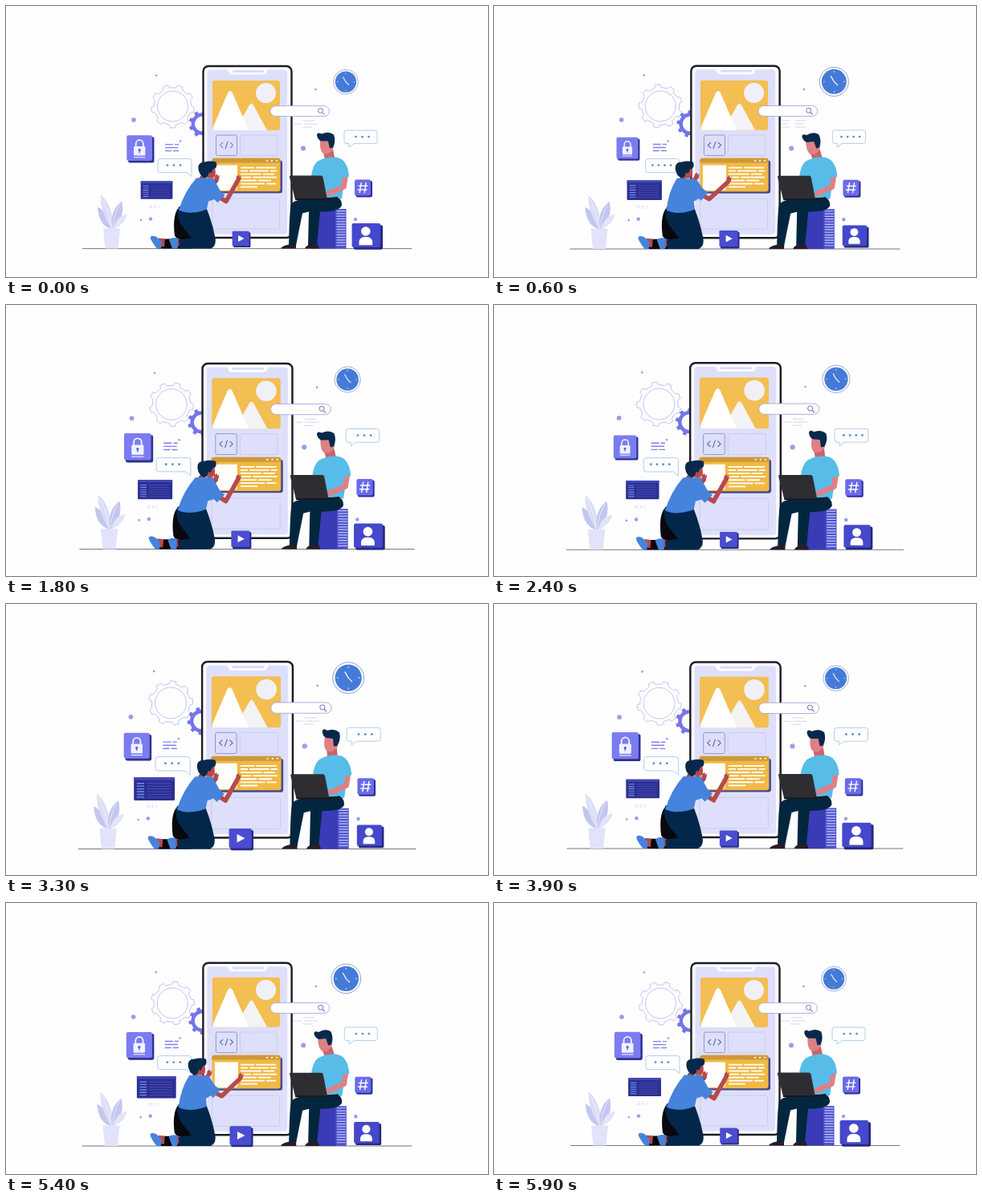
These frames come from a looping animation (600 by 338 pixels, 6000 ms). An HTML page:

```html
<!DOCTYPE html>
<html lang="en">
<head>
<meta charset="utf-8">
<style>
html, body { margin: 0; width: 100%; height: 100%; overflow: hidden; background: #fefefe; }
svg { display: block; width: 100vw; height: 100vh; }
.limb { fill: none; stroke-linecap: round; stroke-linejoin: round; }
</style>
</head>
<body>
<svg viewBox="0 0 600 338" xmlns="http://www.w3.org/2000/svg">
<g id="world">
  <g id="specks"></g>
  <g id="gearA" fill="#fefefe" stroke="#b9bbee" stroke-width=".8"><path/><circle r="19"/></g>
  <g id="gearB"><path fill="#7475ea"/><circle r="9.5" fill="#fefefe"/></g>

  <path d="M95 302H505" stroke="#77777f" stroke-width="1"/>

  <!-- plant -->
  <path d="M129 277Q115 271 114 250Q127 256 131 277Z" fill="#c3c6ef"/>
  <path d="M131 277Q116 252 118 235Q134 249 133 277Z" fill="#dcdef6"/>
  <path d="M132 277Q129 254 144 243Q149 262 134 277Z" fill="#c3c6ef"/>
  <path d="M134 277Q137 262 151 259Q149 270 136 277Z" fill="#e2e4f8"/>
  <path d="M121 277H142L139.500 302H123.500Z" fill="#e2e3fa"/>
  <path d="M118 238Q129 255 131.500 276M142 246Q134 260 133 276" fill="none" stroke="#f4f4fd" stroke-width=".7"/>

  <!-- phone -->
  <rect x="245.500" y="74.400" width="110" height="214" rx="6.500" fill="#fbfbff" stroke="#1d1d26" stroke-width="2.400"/>
  <rect x="250.500" y="79" width="99.500" height="205" rx="4" fill="#dedffa"/>
  <path d="M274 78H328Q325 79 324.500 82Q324 85 320 85H282Q278 85 277.500 82Q277 79 274 78Z" fill="#fdfdff"/>
  <rect x="282" y="79.500" width="39" height="2.600" rx="1.300" fill="#d8d9f6"/>
  <rect x="257" y="92.300" width="84" height="62" rx="3" fill="#f3be52"/>
  <circle cx="323.500" cy="108" r="12.500" fill="#f0f0f6"/>
  <path d="M285 154.300L303 123Q305.500 119 308 123L325 154.300Z" fill="#f4f3f5"/>
  <path d="M258 154.300V150L276 108Q279 103 282 108L302 154.300Z" fill="#fff"/>
  <g fill="none" stroke="#b9bde6" stroke-width=".8">
    <rect x="261.500" y="160.500" width="26" height="25.500" rx="2" stroke="#8288c0"/>
    <rect x="291.500" y="160.500" width="46" height="25.500" rx="2" stroke-dasharray="2 1"/>
    <rect x="257" y="239.500" width="83.500" height="38" rx="2" stroke-dasharray="2 1"/>
  </g>
  <path d="M270 169.500L266.500 173L270 176.500M279 169.500L282.500 173L279 176.500M276 168.500L273 177.500" fill="none" stroke="#555b91" stroke-width="1"/>

  <!-- yellow panel -->
  <rect x="260" y="192" width="84" height="41" rx="3" fill="#474a88"/>
  <rect x="256.500" y="189.200" width="85" height="41.500" rx="3" fill="#f1b945"/>
  <path d="M256.500 195V192Q256.500 189.200 259.500 189.200H338.500Q341.500 189.200 341.500 192V195Z" fill="#cf9938"/>
  <g fill="#fff"><circle cx="325" cy="192.200" r="1.100"/><circle cx="331" cy="192.200" r="1.100"/><circle cx="337" cy="192.200" r="1.100"/></g>
  <path d="M292 201H309M311 201H336M292 205H301M303 205H327M329 205H337M292 209H318M320 209H334M292 213H305M307 213H337M292 217H312M314 217H330M292 221H322M324 221H336M292 225H313" stroke="#fff" stroke-width="1.800"/>
  <path id="sheet" d="M260 198H289V225Q289 229.500 284 229.500H266Q260 229.500 260 225Z" fill="#fffefb"/>

  <!-- search -->
  <rect x="329" y="124" width="73.500" height="13" rx="6.500" fill="#fff" stroke="#a5a9df" stroke-width=".9"/>
  <circle cx="391.500" cy="129.800" r="3" fill="none" stroke="#6266b0" stroke-width=".9"/>
  <path d="M393.800 132.200L396.500 135" stroke="#6266b0" stroke-width="1"/>
  <g stroke="#d3d5ef" stroke-width="1">
    <path id="rowsA" d="M359 142.500H368M375 142.500H388M359 146.500H366M374 146.500H385M359 150.500H368M375 150.500H388"/>
    <path id="rowsB" d="M370 142.500H384M359 146.500H368M371 146.500H388M369 150.500H381"/>
  </g>
  <path d="M198 172H208M210 172H215M198 176H214M198 180H206M208 180H215" stroke="#8082ee" stroke-width="1.400"/>

  <!-- bubbles -->
  <g fill="#fff" stroke="#a9c8ec" stroke-width=".9">
    <path d="M192 190H228Q231 190 231 193V212L225 207H192Q189 207 189 204V193Q189 190 192 190Z"/>
    <path d="M424 154.500H459Q462 154.500 462 157.500V168Q462 171 459 171H433L427 175.500V171H424Q421 171 421 168V157.500Q421 154.500 424 154.500Z"/>
  </g>
  <g id="dots" fill="#5a8ed2"></g>

  <!-- clock -->
  <g id="clock">
    <circle r="17.500" fill="#fff" stroke="#8a9bd0" stroke-width=".9"/>
    <circle r="15" fill="#467ad8"/>
    <path d="M0 -13V-11M0 11V13M-13 0H-11M11 0H13" stroke="#cfe0ff" stroke-width="1"/>
    <path d="M-4 -7L0 0L4.500 4.500" fill="none" stroke="#f2f6ff" stroke-width="1.200"/>
  </g>

  <!-- pulsing tiles -->
  <g id="lock">
    <rect x="-14" y="-14" width="30.500" height="30.500" rx="2" fill="#31338f"/>
    <rect x="-15.800" y="-16" width="30" height="30" rx="2" fill="#7b7cf1"/>
    <path d="M-5 -2V-6A4.300 4.300 0 0 1 3.600 -6V-2" fill="none" stroke="#f1f1ff" stroke-width="1.700"/>
    <rect x="-7.500" y="-3" width="13.500" height="11" rx="1" fill="#f1f1ff"/>
    <path d="M-7.500 10H6" stroke="#f1f1ff" stroke-width="1"/>
    <circle cx="-.8" cy="1.500" r="1.500" fill="#6060d8"/><path d="M-.8 2V5" stroke="#6060d8" stroke-width="1.200"/>
  </g>
  <g id="code">
    <rect x="-22.200" y="-12.500" width="44.500" height="25" rx="1" fill="#2c2f92"/>
    <rect x="-22.200" y="-12.500" width="44.500" height="3" fill="#4346b8"/>
    <path d="M-19 -6H-11M-19 -3H-11M-19 0H-11M-19 3H-11M-19 6H-11M-19 9H-11" stroke="#6f8fe8" stroke-width="1.200"/>
    <path d="M-8 -6H18M-8 -3H18M-8 0H18M-8 3H18M-8 6H18M-8 9H18" stroke="#4a4db2" stroke-width=".9"/>
  </g>
  <g>
    <rect x="435.500" y="217.500" width="20.500" height="20.500" rx="2" fill="#2f3194"/>
    <rect x="434" y="216" width="20" height="20" rx="2" fill="#6a6bea"/>
    <path d="M442.200 219.500L440.200 232.500M448.200 219.500L446.200 232.500M438.500 223.800H450.500M437.500 228.500H449.500" stroke="#fff" stroke-width="1.400"/>
  </g>
  <g id="user">
    <rect x="-15" y="-12.500" width="32.500" height="27.500" rx="2" fill="#26297d"/>
    <rect x="-17" y="-14.500" width="32" height="27" rx="2" fill="#4548cc"/>
    <circle cx="-1.500" cy="-5.500" r="5.200" fill="#fff"/>
    <path d="M-9 10V6Q-8.500 .8 -1.500 .8Q5.500 .8 6 6V10Z" fill="#fff"/>
  </g>

  <!-- kneeling man -->
  <g id="kneeler">
    <path id="farArm" class="limb" stroke="#9c3d41" stroke-width="5"/>
    <path d="M214 252Q207 262 210 286L213 290H190V302H232L234 284Z" fill="#08080e"/>
    <path d="M190 289L198 290L197 300L191 299Z" fill="#b64a4c"/>
    <path d="M180 287Q184 285 188 288L194 294L193 302H188Q184 298 180 290Z" fill="#4583dd"/>
    <path d="M212 289L219 291L217 299L211 298Z" fill="#b64a4c"/>
    <path d="M203 291Q206 287 214 289L213 297Q216 301 212 302H207Z" fill="#4583dd"/>
    <path d="M215 250Q231 244 249 250Q257 270 260.500 289Q262 299 255 302H216L215 291L231 289L220 275Q211 263 215 250Z" fill="#03274a"/>
    <path id="neck" class="limb" stroke="#a34245" stroke-width="7"/>
    <path id="torso" fill="#4583dd"/>
    <path id="nearArm" class="limb" stroke="#b64a4c" stroke-width="5.500"/>
    <path id="sleeve" class="limb" stroke="#4583dd" stroke-width="13" style="stroke-linecap:butt"/>
    <g id="hands" fill="#b64a4c"><path d="M-3 3L-2 -3L1 -5L2 -2L4 -4L3 2L0 4Z"/><path d="M-3 3L-2 -3L1 -5L2 -2L4 -4L3 2L0 4Z"/></g>
    <g id="head">
      <path d="M-2 0L9 -3Q11 2 10 8Q7 12 2 11L-6 8Z" fill="#b64a4c"/>
      <path d="M-11 0Q-12 -9 -3 -9Q4 -11 11 -9Q13 -4 10 -1L7 0L5 5L2 4Q2 9 -3 11Q-10 8 -11 0Z" fill="#06294b"/>
    </g>
  </g>

  <!-- play tile -->
  <g id="play">
    <rect x="-11.500" y="-9.800" width="24.500" height="21.500" rx="1.500" fill="#282b86"/>
    <rect x="-13" y="-11.500" width="24" height="21" rx="1.500" fill="#4b4dd0"/>
    <path d="M-4.500 -5.500L4 -1L-4.500 3.500Z" fill="#fff"/>
  </g>

  <!-- seated man -->
  <path d="M380 253H411V302H380Z" fill="#393cb6"/>
  <path d="M410 252.500H423.500V302H410Z" fill="#4f52cc"/>
  <path id="slats" stroke="#c2c6fa" stroke-width="1.200"/>
  <g id="face">
    <path d="M395 182L407 178L410 193L398 195Z" fill="#c9646a"/>
    <path d="M391 167L404 164L408 176Q404 185 397 184Q390 183 391 167Z" fill="#df8085"/>
    <path d="M387 161Q387 156 393 159Q402 155 408 160Q411 168 407 176L403 177L401 168H392Q388 166 387 161Z" fill="#06294b"/>
  </g>
  <path d="M382 210L391 211L388 232L376 237L381 226Z" fill="#df8085"/>
  <path d="M388 193Q398 187 410 188Q421 189 424 200L418 240H388L386 213L380 211Q382 198 388 193Z" fill="#58bce8"/>
  <path d="M412 238L388 239Q359 239 355 247Q353 251 352 298H361L369 258L377 256L376 298H387L391 256Q416 256 418 248Q418 240 412 238Z" fill="#03263f"/>
  <path d="M342 302Q343 299 352 297H361V302ZM372 302Q373 299 378 297H388L390 302Z" fill="#2a1c24"/>
  <path class="limb" d="M423 209L420.500 225L402 233" stroke="#df8085" stroke-width="6.500"/>
  <path d="M413 195Q423 190 426 205L427 212L415 214Z" fill="#58bce8"/>
  <path d="M354 211H392Q394 211 394.500 213L400 241H360L353 213Q352.500 211 354 211Z" fill="#2e2e32"/>
  <path d="M360 239.500H399L413 237.500V240L399 241.500H360Z" fill="#18181c"/>
</g>
</svg>
<script>
const $ = id => document.getElementById(id);
const TAU = Math.PI * 2, LOOP = 6000, BEAT = 2000;
const mix = (a, b, k) => a + (b - a) * k;
const ease = x => { x = Math.min(1, Math.max(0, x)); return x * x * (3 - 2 * x); };
const wave = (t, peak, period) => Math.cos(TAU * (t - peak) / period);
const set = (el, name, value) => el.setAttribute(name, value);

function gearPath(teeth, r, depth) {
  let d = "";
  const step = TAU / teeth;
  for (let i = 0; i < teeth; i++) {
    [[-.25, r], [-.17, r + depth], [.17, r + depth], [.25, r]].forEach(([o, q]) => {
      const a = (i + o) * step;
      d += (d ? "L" : "M") + (q * Math.cos(a)).toFixed(2) + " " + (q * Math.sin(a)).toFixed(2);
    });
  }
  return d + "Z";
}
set($("gearA").firstElementChild, "d", gearPath(9, 23.5, 3.5));
set($("gearB").firstElementChild, "d", gearPath(9, 14, 3));

// x, y, radius
$("specks").innerHTML = [[159, 141.5, 2.8], [187, 86, 1.3], [385.5, 103.5, 1.3], [370, 177, 3], [217, 168, 1.3],
  [180, 265, 2.2], [168, 266.5, 1.3], [435, 265.5, 2.2]]
  .map(([x, y, r]) => `<circle cx="${x}" cy="${y}" r="${r}" fill="#9a9cec"/>`).join("") +
  '<path d="M178 248H182V252H178ZM184 248H187V252H184ZM189 248H191V252H189Z" fill="#ecedf9"/>';

let slats = "";
for (let y = 255; y < 301; y += 3.3) slats += `M411.5 ${y.toFixed(1)}H422.5`;
set($("slats"), "d", slats);

// id, x, y, swing, time of largest size
const pulses = [["lock", 167, 177.5, .11, 1680], ["code", 187.5, 229, .125, 1170],
  ["user", 449.5, 286.5, .115, 1950], ["play", 293, 290.3, .15, 1180], ["clock", 423, 94, .125, 1020]];

// Leaning-in and leaning-back poses
const poses = {
  torso: ["M$ $Q$ $ $ $Q$ $ $ $L$ $Q$ $ $ $L$ $Q$ $ $ $Z",
    [237, 214, 222, 231, 215, 254, 229, 261, 250, 253, 252, 243, 260, 241, 270, 236, 258, 214, 248, 213],
    [228, 214, 217, 231, 215, 254, 229, 261, 250, 253, 249, 243, 254, 240, 264, 234, 252, 215, 240, 213]],
  sleeve: ["M$ $L$ $", [250, 223, 268, 240], [244, 222, 262, 237]],
  nearArm: ["M$ $L$ $L$ $", [264, 237, 274, 243, 288, 218], [259, 235, 268, 240, 291, 219]],
  farArm: ["M$ $L$ $L$ $", [246, 221, 256, 224, 262, 217], [238, 220, 246, 221, 251, 214]],
  neck: ["M$ $L$ $", [249, 208, 244, 215], [236, 208, 235, 215]]
};

function drawKneeler(k) {
  for (const id in poses) {
    const [shape, a, b] = poses[id];
    let i = 0;
    set($(id), "d", shape.replace(/\$/g, () => { const v = mix(a[i], b[i], k).toFixed(2); i++; return v; }));
  }
  set($("head"), "transform", `translate(${mix(250.5, 237, k)} 203)`);
  const [far, near] = $("hands").children;
  set(far, "transform", `translate(${mix(262, 252, k)} ${mix(214, 212, k)})`);
  set(near, "transform", `translate(${mix(289, 292, k)} ${mix(215, 216, k)})`);
  set($("sheet"), "transform", `translate(${mix(-1, 0, k)} 0)`);
}

function drawDots(n) {
  const gap = n === 4 ? 7.5 : 8;
  let s = "";
  for (const [cx, cy] of [[209, 198], [443.5, 162.5]])
    for (let i = 0; i < n; i++)
      s += `<circle cx="${cx + (i - (n - 1) / 2) * gap}" cy="${cy}" r="1.4"/>`;
  $("dots").innerHTML = s;
}

function draw(t) {
  const zoom = 1 + .0265 * (1 - wave(t, 0, LOOP)) / 2;
  set($("world"), "transform", `translate(300 190.6) scale(${zoom}) translate(-300 -190)`);
  for (const [id, x, y, swing, peak] of pulses)
    set($(id), "transform", `translate(${x} ${y}) scale(${1 + swing * wave(t, peak, BEAT)})`);

  const turn = t / BEAT;
  set($("gearA"), "transform", `translate(207.500 124.500) rotate(${turn * 40 + 10})`);
  set($("gearB"), "transform", `translate(244.500 146.500) rotate(${-turn * 40})`);

  const p = t % (2 * BEAT);
  drawKneeler(ease((p - 80) / 400) * (1 - ease((p - 1330) / 430)));
  set($("face"), "transform", `rotate(${8 * wave(p, 3000, 2 * BEAT)} 403 195)`);
  const rows = ease((p - 100) / 300) * (1 - ease((p - 1200) / 200));
  set($("rowsA"), "opacity", rows);
  set($("rowsB"), "opacity", 1 - rows);
  const beat = t % BEAT;
  drawDots(beat >= 300 && beat < 900 ? 4 : 3);
}

function tick() {
  draw(Math.floor(performance.now() % LOOP / 100) * 100);
  requestAnimationFrame(tick);
}
tick();
</script>
</body>
</html>
```
